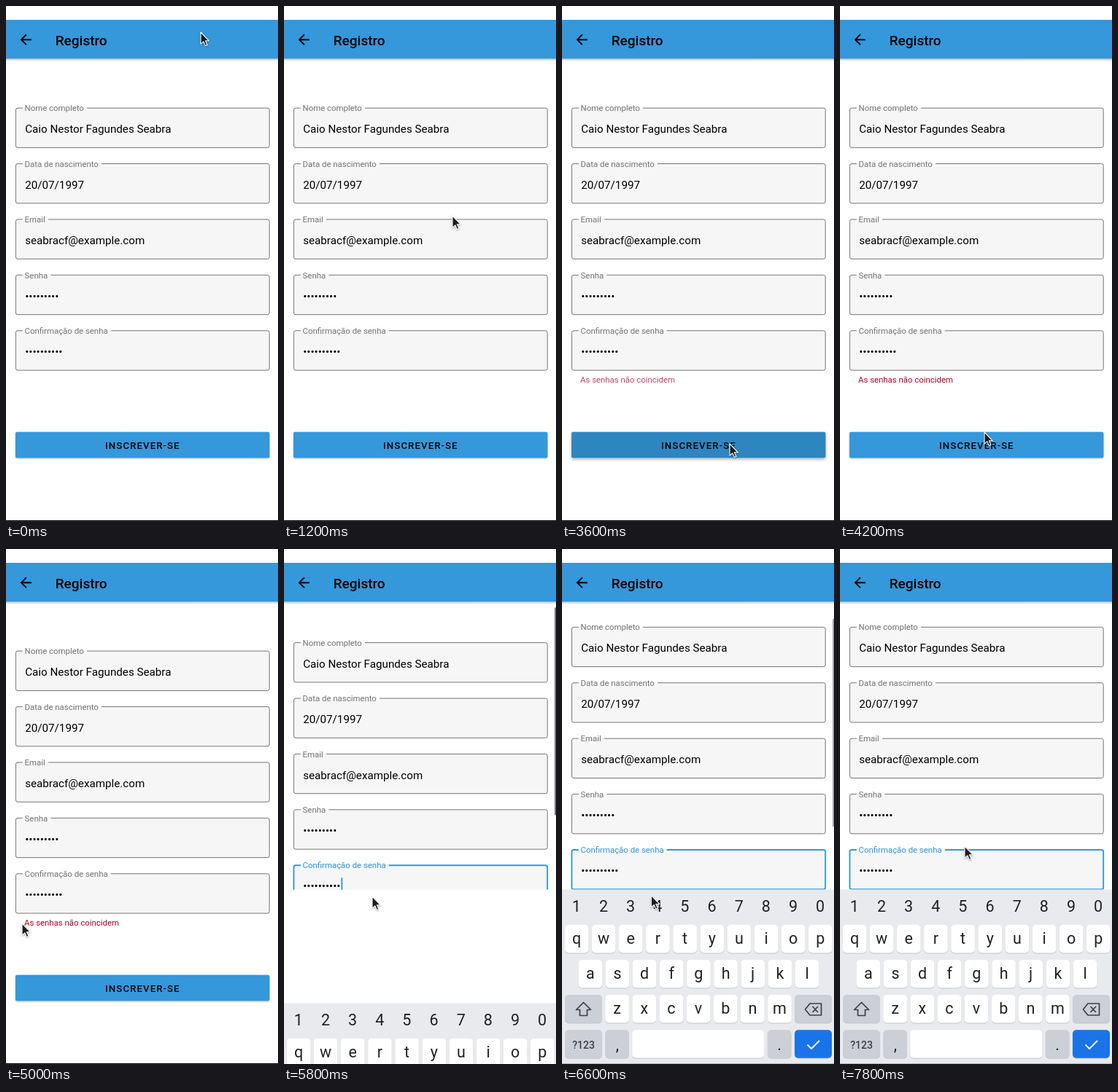
Recreate the animation shown at these times as an HTML page. Size 373x707 px, loop 8 s.

```html
<!DOCTYPE html>
<html lang="pt">
<head>
<meta charset="utf-8">
<title>Registro</title>
<style>
  html, body { margin: 0; width: 100%; height: 100%; overflow: hidden; background: #fff; }
  svg { display: block; width: 100vw; height: 100vh; font-family: Roboto, sans-serif; }
  .title { font-size: 19px; font-weight: 500; }
  .label, .error { font-size: 11.4px; }
  .value { font-size: 15.2px; }
  .cta { font-size: 13.3px; font-weight: 500; letter-spacing: 1.05px; }
  .key { font-size: 21.5px; fill: #202124; text-anchor: middle; }
  .small { font-size: 14px; font-weight: 500; fill: #3c4043; text-anchor: middle; }
  .icon { fill: none; stroke: #3c4043; stroke-width: 1.7; stroke-linejoin: round; }
</style>
</head>
<body>
<svg id="stage" viewBox="0 0 373 707">
  <defs>
    <clipPath id="view"><rect id="viewRect" y="72" width="373" height="635"/></clipPath>
    <clipPath id="ctaClip"><rect x="13" y="584.8" width="348.4" height="35.4" rx="2"/></clipPath>
    <linearGradient id="shade" x2="0" y2="1">
      <stop offset="0" stop-color="#000" stop-opacity=".26"/>
      <stop offset="1" stop-color="#000" stop-opacity="0"/>
    </linearGradient>
  </defs>
  <rect width="373" height="707" fill="#fff"/>
  <g clip-path="url(#view)">
    <g id="form">
      <text id="error" class="error" x="25" y="516.6" fill="#b00020">As senhas não coincidem</text>
      <rect id="cta" x="13" y="584.8" width="348.4" height="35.4" rx="2" fill="#3498db"/>
      <g clip-path="url(#ctaClip)"><circle id="ripple" cx="229" cy="602" fill="#000" fill-opacity=".12"/></g>
      <text class="cta" x="136" y="607.8">INSCREVER-SE</text>
    </g>
    <rect id="bar" x="371" width="2" height="285" fill="#7c7c7c"/>
  </g>
  <rect y="72" width="373" height="4" fill="url(#shade)"/>
  <rect y="19" width="373" height="53.2" fill="#3498db"/>
  <path transform="translate(15.8 34.8) scale(.95)" d="M20 11H7.83l5.59-5.59L12 4l-8 8 8 8 1.41-1.41L7.83 13H20z"/>
  <text class="title" x="67.7" y="53.6">Registro</text>
  <rect y="706" width="373" height="1"/>
  <g id="keyboard"><rect y="467.5" width="373" height="240" fill="#e8eaed"/></g>
  <path id="cursor" d="M0 0V16.2L3.8 12.8 6.4 18.6 9 17.5 6.4 11.8H11.4Z" fill="#1c1c1c" stroke="#fff"
    stroke-width="1.1" stroke-linejoin="round" style="filter:drop-shadow(0 1px 1px rgba(0,0,0,.35))"/>
</svg>
<script>
const $ = id => document.getElementById(id);
const BLUE = '#3498db', GRAY = '#757575';

function add(parent, tag, attrs, text) {
  const el = document.createElementNS('http://www.w3.org/2000/svg', tag);
  for (const k in attrs) el.setAttribute(k, attrs[k]);
  if (text) el.textContent = text;
  return parent.appendChild(el);
}
const set = (el, attrs) => { for (const k in attrs) el.setAttribute(k, attrs[k]); };

// Form fields
const dots = n => '•'.repeat(n);
const fields = [
  ['Nome completo', 'Caio Nestor Fagundes Seabra'],
  ['Data de nascimento', '20/07/1997'],
  ['Email', 'seabracf@example.com'],
  ['Senha', dots(9)],
  ['Confirmação de senha', dots(10)]
].map(([name, value], i) => {
  const y = 140.1 + i * 76.42;
  const box = add($('form'), 'rect', { x: 13.4, y, width: 347.8, height: 54.3, rx: 2.6, fill: '#f6f6f6' });
  const notch = add($('form'), 'rect', { x: 22.8, y: y - 1.2, height: 2.6, fill: '#f6f6f6' });
  const label = add($('form'), 'text', { class: 'label', x: 25.6, y: y + 4.2 }, name);
  notch.setAttribute('width', label.getComputedTextLength() + 7);
  const input = add($('form'), 'text', { class: 'value', x: 26.2, y: y + 34.2 }, value);
  return { box, label, input };
});
const confirm = fields[4];
const caret = add($('form'), 'rect', { y: 462.8, width: 1.9, height: 21, fill: BLUE });

// Keyboard
const kb = $('keyboard'), PITCH = 37.15;
function key(x, y, w, fill) {
  add(kb, 'rect', { x, y: y + 1, width: w, height: 38.5, rx: 5, fill: '#b4b7bc', opacity: .7 });
  add(kb, 'rect', { x, y, width: w, height: 38.5, rx: 5, fill });
}
function letters(chars, x, y, caps = true) {
  [...chars].forEach((c, i) => {
    const cx = x + i * PITCH;
    if (caps) key(cx - 16.3, y, 32.6, '#fff');
    add(kb, 'text', { class: 'key', x: cx, y: y + 26 }, c);
  });
}
letters('1234567890', 19.8, 472, false);
letters('qwertyuiop', 20, 516);
letters('asdfghjkl', 38.8, 564);
letters('zxcvbnm', 75.6, 612);
const TONE = '#cccfd6';
key(4, 612, 51, TONE);
key(319, 612, 51, TONE);
key(4, 660.3, 51, TONE);
key(59.4, 660.3, 32.6, TONE);
key(96.2, 660.3, 181, '#fff');
key(281.8, 660.3, 32.6, TONE);
key(319, 660.3, 51, '#1a73e8');
add(kb, 'path', { class: 'icon', d: 'M29.5 622.5L39.5 632.5H34.5V640.5H24.5V632.5H19.5Z' });
add(kb, 'path', { class: 'icon', d: 'M340 624H355.5V640H340L333.5 632ZM343.5 628L351 636M351 628L343.5 636' });
add(kb, 'path', { class: 'icon', d: 'M336.5 680.5L342 686 353 675', style: 'stroke:#fff;stroke-width:1.9' });
add(kb, 'text', { class: 'small', x: 29.5, y: 685.5 }, '?123');
add(kb, 'text', { class: 'key', x: 75.8, y: 688 }, ',');
add(kb, 'text', { class: 'key', x: 298, y: 688 }, '.');
add(kb, 'rect', { y: 706, width: 373, height: 1, fill: '#b5b6ba' });

// Pointer path: time, x, y
const path = [
  [0, 267, 36], [100, 267, 35], [900, 240, 217], [1200, 231, 288], [1800, 221, 432],
  [2100, 218, 502], [2400, 223, 570], [2500, 223, 570], [2600, 228, 601], [2700, 228, 601],
  [2800, 230, 601], [4000, 230, 601], [4250, 190, 581], [4500, 80, 532], [4700, 26, 512],
  [4900, 19, 517], [5000, 22, 514], [5200, 62, 492], [5400, 111, 478], [5600, 111, 478],
  [5700, 121, 477], [6500, 121, 477], [6800, 125, 473], [7000, 125, 473], [7500, 160, 424], [7800, 171, 408]
];
function pointer(t) {
  const i = path.findIndex(p => p[0] > t);
  if (i < 0) return path[path.length - 1].slice(1);
  const [a, b] = [path[i - 1], path[i]];
  const k = (t - a[0]) / (b[0] - a[0]);
  return [a[1] + (b[1] - a[1]) * k, a[2] + (b[2] - a[2]) * k];
}
const ramp = (t, a, b) => Math.min(1, Math.max(0, (t - a) / (b - a)));
const within = (t, a, b) => t >= a && t < b;

function draw(t) {
  const [x, y] = pointer(t);
  set($('cursor'), { transform: `translate(${x} ${y})` });

  // Button press and validation message
  const pressed = within(t, 3300, 3700);
  set($('ripple'), { r: pressed ? 20 + 220 * ramp(t, 3300, 3550) : 0 });
  const lift = pressed ? ramp(t, 3200, 3500) : 0;
  $('cta').style.filter = `drop-shadow(0 ${1 + lift}px ${1 + lift}px rgba(0,0,0,.32))`;
  set($('error'), { opacity: ramp(t, 3380, 3680) });

  // Focus, keyboard and scroll
  const focus = t >= 5700;
  const slide = 1 - Math.pow(1 - ramp(t, 5700, 6100), 1.5);
  set($('form'), { transform: `translate(0 ${-32.8 * slide})` });
  set($('viewRect'), { height: t >= 5800 ? 395.8 : 635 });
  set(kb, { transform: `translate(0 ${240 * (1 - slide)})` });
  set($('bar'), { y: 72 + 24 * slide, opacity: t >= 5800 ? 1 - ramp(t, 6500, 6800) : 0 });
  for (const f of fields) {
    const on = focus && f === confirm;
    set(f.box, { stroke: on ? BLUE : GRAY, 'stroke-width': on ? 1.9 : 1 });
    set(f.label, { fill: on ? BLUE : GRAY });
  }

  // Last character removed
  const erased = t >= 7200;
  confirm.input.textContent = dots(erased ? 9 : 10);
  const blink = within(t, 5700, 6300) || within(t, 6800, 7700);
  set(caret, { x: erased ? 73.2 : 78.4, opacity: blink ? 1 : 0 });
}

function tick() {
  draw(Math.floor(performance.now() % 8000 / 100) * 100);
  requestAnimationFrame(tick);
}
tick();
</script>
</body>
</html>
```
